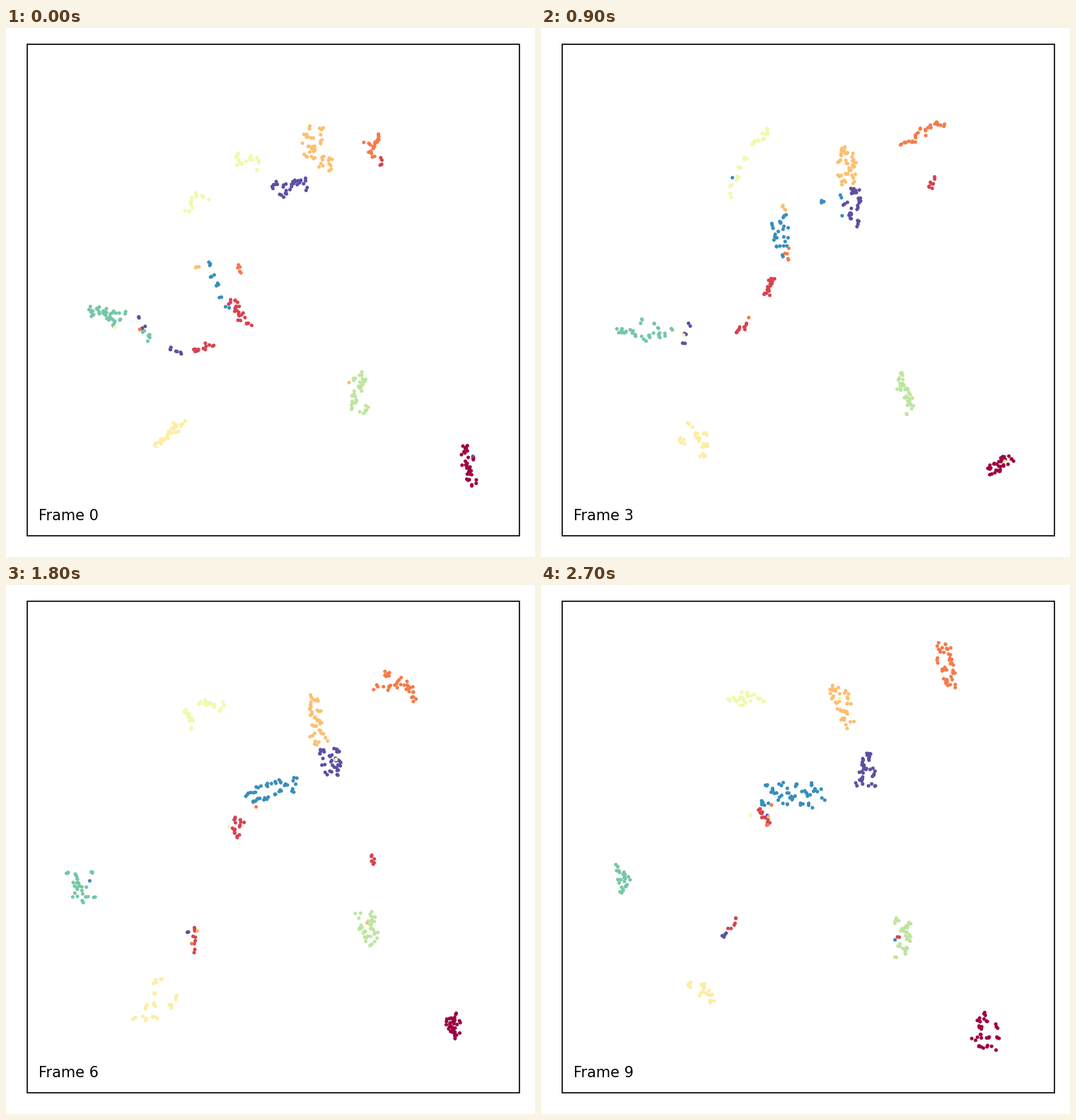
Write a matplotlib script that moves like this. It is 748 px wide and 748 px high and loops after 3 s.

```python
import matplotlib.pyplot as plt
import numpy as np
from matplotlib.animation import FuncAnimation
from matplotlib.patches import Rectangle

SIZE, DPI = 748, 100
FRAMES, INTERVAL = 10, 300
CLASSES, STRAYS = 10, 7
MAROON, RED, ORANGE, AMBER, SAND, LIME, GREEN, TEAL, BLUE, PURPLE = range(CLASSES)
palette = plt.get_cmap("Spectral")(np.linspace(0, 1, CLASSES))
blobs = []


def blob(kind, count, *poses, span=(0, FRAMES - 1)):
    """A drifting group of dots.

    count: dots at the start and end of its span.
    poses: evenly timed (x, y, half-axis dx, dy, half-width) to glide through.
    """
    blobs.append((kind, count, np.array(poses, float), span))


def glide(poses, progress):
    stops = np.linspace(0, 1, len(poses))
    return np.array([np.interp(progress, stops, column) for column in poses.T])


def clumpy(pose, count, rng):
    """Dots in small clumps strung along the pose's axis."""
    centre, axis, width = pose[:2], pose[2:4], pose[4]
    across = np.array([-axis[1], axis[0]]) / np.hypot(*axis)
    clumps = count // 3 + 1
    along = np.linspace(-0.95, 0.95, clumps)[:, None]
    side = rng.uniform(-width, width, (clumps, 1))
    middles = centre + along * axis + side * across
    owner = np.arange(count) % clumps
    wobble = rng.normal(0, min(2.4, 1 + width / 4), (count, 2))
    return middles[owner] + wobble.clip(-5, 5)


def scene(frame):
    rng = np.random.default_rng(40 + frame)
    kinds, groups, centres = [], [], []
    for kind, count, poses, (first, last) in blobs:
        if first <= frame <= last:
            progress = (frame - first) / (last - first)
            pose = glide(poses, progress)
            dots_here = round(np.interp(progress, [0, 1], count))
            groups.append(clumpy(pose, dots_here, rng))
            kinds += [kind] * dots_here
            centres.append(pose[:2])
    # A few dots of any class end up near some other group.
    hosts = np.array(centres)[rng.integers(len(centres), size=STRAYS)]
    groups.append(hosts + rng.normal(0, 10, hosts.shape))
    kinds += list(rng.choice([ORANGE, AMBER, LIME, BLUE, PURPLE], STRAYS))
    return np.vstack(groups), palette[kinds]


blob(MAROON, (34, 38), (655, 619, 2, 29, 8), (648, 617, 12, -13, 8),
     (634, 623, 6, 14, 9), (628, 632, 8, 26, 18))

blob(RED, (24, 14), (329, 402, 12, 18, 5), (323, 367, -5, 12, 3),
     (327, 342, 2, 14, 6), (315, 326, 8, 9, 4))
blob(RED, (14, 6), (278, 451, 13, -5, 2), (284, 424, 9, -6, 2),
     (266, 500, 1, 15, 3), (271, 478, 5, -8, 1))
blob(RED, (4, 10), (530, 189, 1, 4, 1), (567, 238, 5, -13, 1), span=(0, 5))
blob(RED, (6, 2), (518, 388, 1, 6, 1), (505, 502, 1, 5, 1), span=(6, 9))

blob(ORANGE, (21, 46), (517, 162, 8, -14, 8), (540, 149, 31, -14, 6),
     (554, 145, 27, 14, 14), (570, 114, 5, 32, 11))
blob(ORANGE, (5, 2), (329, 340, 1, 3, 1), (347, 322, 2, 4, 1),
     (351, 311, 2, 4, 1), (322, 334, 3, -4, 1))

blob(AMBER, (46, 42), (438, 172, 8, 32, 17), (433, 194, 4, 27, 14),
     (440, 192, 4, 35, 10), (430, 167, 12, 28, 12))
blob(AMBER, (3, 5), (270, 337, 3, -1, 1), (391, 198, 2, 4, 1), span=(0, 5))

blob(SAND, (34, 26), (231, 572, 22, -13, 6), (219, 586, 20, 14, 16),
     (214, 593, 18, -32, 20), (227, 576, 14, 17, 9))

blob(LIME, (20, 14), (342, 186, 16, 6, 10), (311, 154, 12, -11, 4),
     (290, 169, 18, 2, 5), (297, 161, 16, 4, 5))
blob(LIME, (12, 14), (266, 246, 10, -12, 5), (276, 210, -10, 28, 6),
     (254, 192, 8, 8, 9), (280, 160, 14, 2, 6))

blob(GREEN, (40, 40), (498, 518, 3, 29, 11), (513, 516, 9, 26, 8),
     (512, 485, 4, 22, 12), (510, 497, 1, 28, 12))

blob(TEAL, (42, 26), (141, 407, 25, 6, 10), (146, 425, 37, 8, 13),
     (109, 424, 8, 24, 16), (114, 416, 2, 18, 8))
blob(TEAL, (8, 12), (199, 434, 3, 6, 3), (184, 432, 11, 3, 9), span=(0, 2))

blob(BLUE, (13, 58), (298, 364, 14, 32, 3), (342, 292, 6, 26, 13),
     (377, 291, 35, -14, 13), (355, 294, 45, 0, 19))
blob(BLUE, (5, 5), (408, 222, 8, 16, 8), (412, 258, 20, -15, 8), span=(2, 4))

blob(PURPLE, (32, 42), (402, 226, 27, -3, 9), (441, 252, 2, 28, 12),
     (459, 249, 3, 21, 14), (457, 262, 3, 25, 14))
blob(PURPLE, (4, 6), (190, 416, 3, 7, 1), (203, 432, 5, -13, 3), span=(0, 3))
blob(PURPLE, (7, 9), (241, 456, 7, 4, 2), (223, 450, 3, 9, 4), span=(0, 2))
blob(PURPLE, (2, 4), (262, 488, 1, 1, 1), (256, 502, 5, 4, 1),
     (259, 494, 2, -2, 1), span=(5, 9))

fig = plt.figure(figsize=(SIZE / DPI, SIZE / DPI), dpi=DPI, facecolor="white")
ax = fig.add_axes([0, 0, 1, 1])
ax.set(xlim=(0, SIZE), ylim=(SIZE, 0))
ax.axis("off")
ax.add_patch(Rectangle((30, 23), 696, 695, fill=False, ec="black", lw=1.2))
label = ax.text(46, 696, "", fontsize=15, family="DejaVu Sans")
dots = ax.scatter([], [], s=13.5, linewidths=0)


def draw(frame):
    places, colors = scene(frame)
    dots.set_offsets(places + 0.5)
    dots.set_facecolors(colors)
    label.set_text(f"Frame {frame}")
    return dots, label


anim = FuncAnimation(fig, draw, frames=FRAMES, interval=INTERVAL, repeat=True)
plt.show()
```
